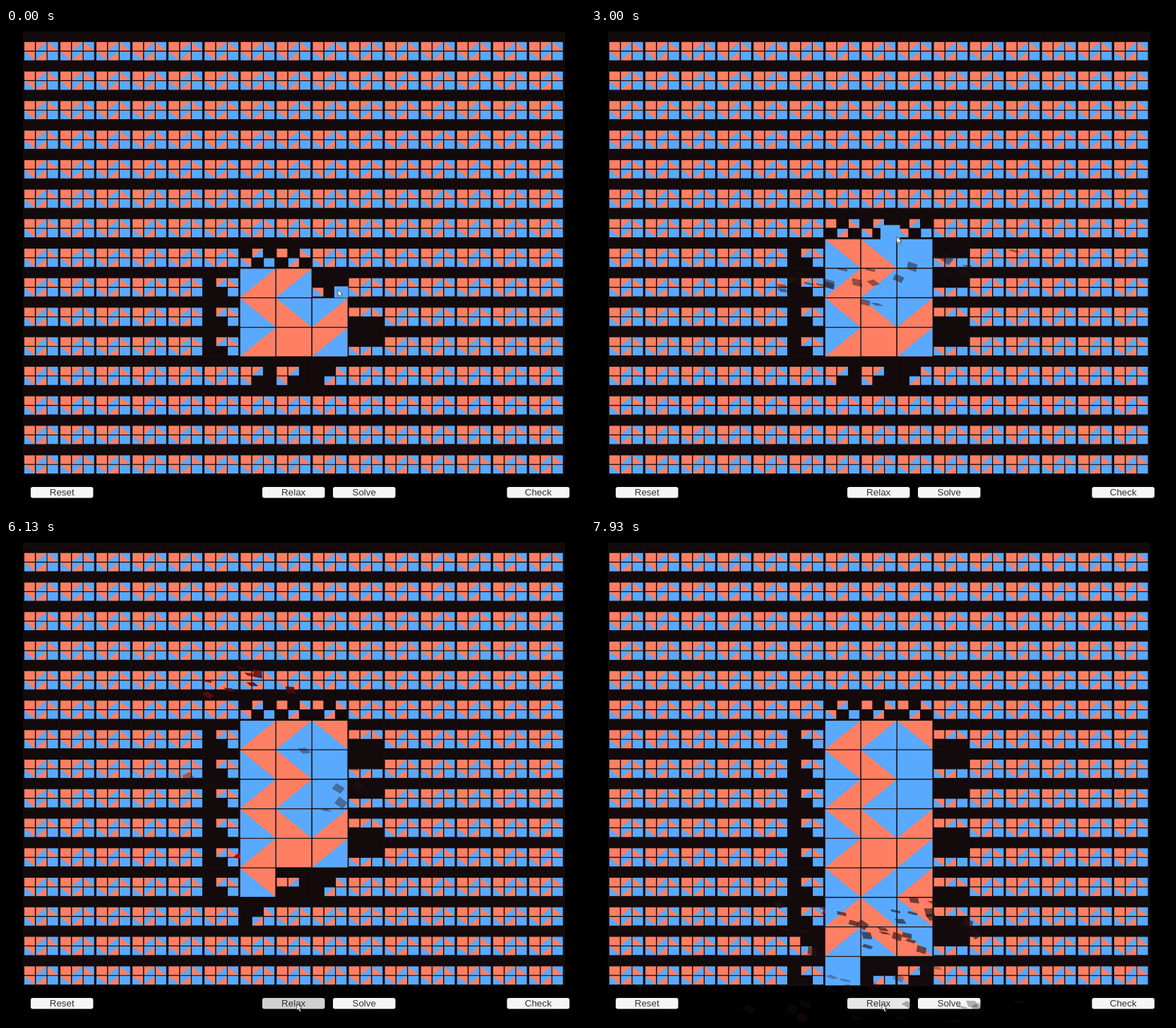
Recreate the animation shown at these times as an HTML page with a canvas. Size 820 px wide and 683 px high, loop 8 s.

```html
<!DOCTYPE html>
<html>
<head>
<meta charset="utf-8">
<style>
  html, body { margin: 0; width: 820px; height: 683px; overflow: hidden; background: #000; }
  canvas { display: block; }
</style>
</head>
<body>
<canvas id="stage" width="820" height="683"></canvas>
<script>
const ctx = document.getElementById('stage').getContext('2d');
const LOOP = 8000, SIZE = 15;
const COLORS = { r: '#ff7f63', b: '#59a9ff' };

// Edge colours of each tile: top, right, bottom, left
const TYPES = { R: 'rrrr', A: 'rbbr', E: 'bbrr', D: 'rrbb', C: 'brrb', B: 'bbbb' };
const ORDER = [...'RAEDCB'];

// Solved area: columns 6-8, rows 6-14, and when each tile settles
const SOLVED = ['CAD', 'DEB', 'CAB', 'DEC', 'CRA', 'DAC', 'CED', 'ADE', 'B'];
const TIMES = [
  [5570, 5070, 3450], [2030, 2030, 2030], [0, 0, 1040], [0, 0, 0], [0, 0, 0],
  [6050, 6400, 6400], [6750, 6750, 6750], [7130, 7130, 7130], [7650]
];
const tiles = SOLVED.flatMap((row, j) => [...row].map((type, i) =>
  ({ col: 6 + i, row: 6 + j, type, time: TIMES[j][i] })));

const CLICKS = [5070, 5570, 6050, 6400, 6750, 7130, 7650];
const HOVERS = [ // start, end, column, row, option
  [0, 1040, 8, 8, 'B'], [1500, 2030, 8, 7, 'B'], [2700, 3150, 7, 6, 'B'], [3230, 3450, 8, 6, 'D']
];
const POINTER = [ // time, x, y
  [0, 470, 370], [1040, 470, 370], [1500, 471, 331], [2300, 471, 331], [2800, 433, 295],
  [3150, 433, 295], [3300, 440, 288], [3900, 440, 286], [4750, 404, 652], [5000, 412, 657]
];
const BUTTONS = [['Reset', 35], ['Relax', 363], ['Solve', 463], ['Check', 709.5]];

const cellX = c => 25.2 + 51.07 * c;
const cellY = r => 6.4 + 41.75 * r;
const clamp = v => Math.max(0, Math.min(1, v));
const ease = v => { v = clamp(v); return v * v * (3 - 2 * v); };
const mix = (a, b, p) => a + (b - a) * p;
const rand = n => { const v = Math.sin(n * 127.1 + 3.7) * 43758.5453; return v - Math.floor(v); };

function polygon(points) {
  ctx.beginPath();
  points.forEach(p => ctx.lineTo(...p));
  ctx.closePath();
  ctx.fill();
}

function drawTile(type, x, y, w, h) {
  const [top, , bottom, left] = TYPES[type];
  ctx.fillStyle = COLORS[top];
  ctx.fillRect(x, y, w, h);
  if (top === bottom) return;
  ctx.fillStyle = COLORS[bottom];
  polygon([[x, y + h], [x + w, y + h], [left === bottom ? x : x + w, y]]);
}

function drawOption(type, col, row, scale = 1) {
  const i = ORDER.indexOf(type), w = 14.9 * scale, h = 12.2 * scale;
  const x = cellX(col) + 0.8 + 16.4 * (i % 3) + 7.45;
  const y = cellY(row) + 13.4 + 13.5 * Math.floor(i / 3) + 6.1;
  drawTile(type, x - w / 2, y - h / 2, w, h);
}

// Options whose edges agree with every settled neighbour
function optionsAt(grid, col, row) {
  const around = [[0, -1], [1, 0], [0, 1], [-1, 0]];
  return ORDER.filter(type => around.every(([dx, dy], side) => {
    const next = grid[[col + dx, row + dy]];
    return !next || TYPES[next][(side + 2) % 4] === TYPES[type][side];
  }));
}

// Shards are flung up from a settled tile, fall, darken and fade
function drawShards(t, young) {
  tiles.forEach((tile, n) => {
    const age = (t - tile.time) / 1000;
    if (!tile.time || age < 0 || age > 1.55 || (age < 0.35) !== young) return;
    for (let i = 0; i < 8; i++) {
      const rnd = k => rand(n * 61 + i * 7 + k);
      const x = cellX(tile.col) + 25 + mix(-30, 30, rnd(1)) + mix(-135, 135, rnd(2)) * age;
      const y = cellY(tile.row) + 20 + mix(-38, -2, rnd(3)) - mix(240, 310, rnd(4)) * age + 340 * age * age;
      const dark = clamp((age - 0.1) / 0.7), shade = mix(0.65, 1, rnd(5));
      const alpha = age < 0.95 ? mix(1, 0.5, clamp((age - 0.4) / 0.55)) : mix(0.5, 0, (age - 0.95) / 0.6);
      const turn = rnd(6) * 6.28 + (rnd(2) - 0.5) * 3 * age;
      const flat = 0.55 + 0.35 * Math.cos(rnd(1) * 6 + 4 * age);
      const size = 8 + 1.5 * age;
      const corners = [0, 1, 2, 3].map(k => {
        const a = turn + k * Math.PI / 2;
        return [x + size * Math.cos(a), y + size * flat * Math.sin(a) + 2 * Math.cos(a)];
      });
      const red = mix(235, 48, dark) * shade, rest = mix(0, 20, dark);
      ctx.fillStyle = `rgba(${red},${rest},${rest},${alpha})`;
      polygon(young ? corners.slice(1) : corners);
    }
  });
}

function drawButtons(t) {
  ctx.font = '13.4px "Liberation Sans", Arial, sans-serif';
  ctx.textAlign = 'center';
  ctx.textBaseline = 'alphabetic';
  for (const [label, x] of BUTTONS) {
    let level = 245;
    if (label === 'Relax') {
      const press = Math.max(...CLICKS.map(c =>
        clamp((t - c + 60) / 60) * clamp((c + 190 - t) / 80)));
      level = mix(245, 230, clamp((t - 4680) / 100)) - 22 * press;
    }
    ctx.fillStyle = `rgb(${level},${level},${level})`;
    ctx.beginPath();
    ctx.roundRect(x, 649, 88.5, 15.4, 3);
    ctx.fill();
    ctx.fillStyle = '#323232';
    ctx.fillText(label, x + 44.2, 661.4);
  }
}

function drawPointer(t) {
  const i = Math.max(0, POINTER.findLastIndex(p => p[0] <= t));
  const a = POINTER[i], b = POINTER[i + 1] || a;
  const p = ease((t - a[0]) / (b[0] - a[0] || 1));
  ctx.save();
  ctx.translate(mix(a[1], b[1], p), mix(a[2], b[2], p));
  ctx.fillStyle = '#fff';
  ctx.strokeStyle = '#333';
  ctx.lineWidth = 0.8;
  polygon([[0, 0], [0, 9.5], [2.2, 7.6], [4, 11.4], [5.7, 10.6], [4, 7], [7, 6.8]]);
  ctx.stroke();
  ctx.restore();
}

function draw(t) {
  ctx.fillStyle = '#000';
  ctx.fillRect(0, 0, 820, 683);
  ctx.fillStyle = '#1c1011';
  ctx.fillRect(24, 5.2, 767.4, 627);

  const settled = tiles.filter(tile => tile.time <= t), grid = {};
  settled.forEach(tile => grid[[tile.col, tile.row]] = tile.type);

  for (let r = 0; r < SIZE; r++) for (let c = 0; c < SIZE; c++) {
    ctx.fillStyle = '#120a0b';
    ctx.fillRect(cellX(c) - 0.3, cellY(r) - 0.5, 50.1, 41);
    if (!grid[[c, r]]) optionsAt(grid, c, r).forEach(type => drawOption(type, c, r));
  }

  drawButtons(t);
  drawShards(t, true);
  settled.forEach(tile => drawTile(tile.type, cellX(tile.col) + 0.2, cellY(tile.row), 49.5, 40.3));
  drawShards(t, false);

  for (const [start, end, col, row, type] of HOVERS) {
    if (t < start || t >= end) continue;
    const grow = start ? ease((t - start) / 220) : t < 200 ? 0.38 : 1;
    drawOption(type, col, row, 1 + 0.85 * grow);
  }
  drawPointer(t);
}

let began;
function tick(now) {
  began ??= now;
  draw((now - began) % LOOP);
  requestAnimationFrame(tick);
}
requestAnimationFrame(tick);
</script>
</body>
</html>
```
